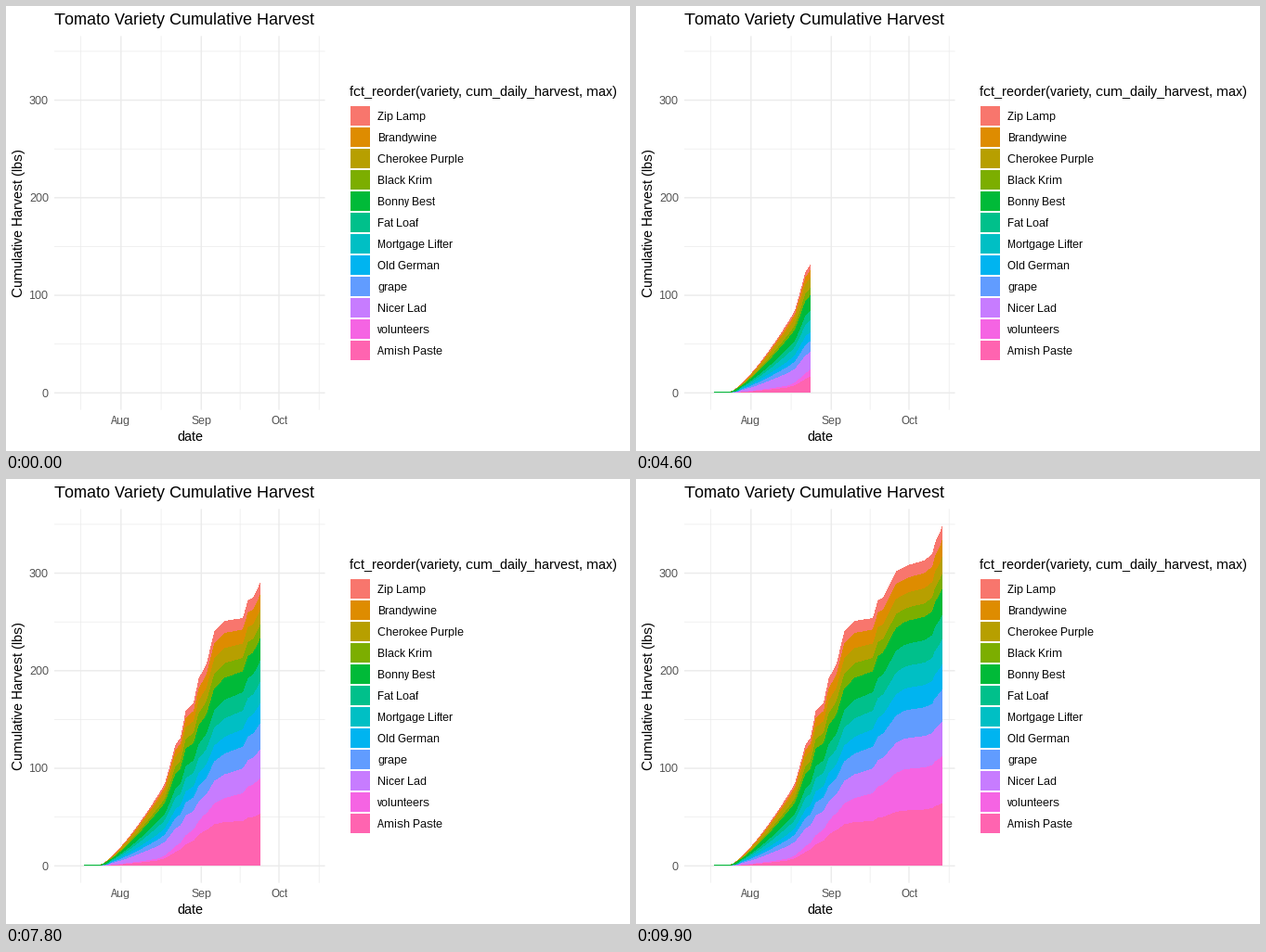
Write a matplotlib script that moves like this. It is 672 by 480 pixels and loops after 10 s.

```python
import matplotlib.pyplot as plt
import numpy as np
from matplotlib.animation import FuncAnimation
from matplotlib.patches import Polygon, Rectangle

plt.rcParams.update({
    "font.family": "Liberation Sans",
    "text.hinting": "default",
    "text.hinting_factor": 1,
})

W, H, DPI = 672, 480, 96
FRAMES, INTERVAL = 100, 100
LAST_DAY, FIRST_PICK = 95, 6.7          # days since 11 July
LEFT, RIGHT, TOP, BOTTOM = 52, 343.5, 32.4, 435.6
BASE = 417

# name, colour, relative yield in early, mid and late season
VARIETIES = [
    ("Zip Lamp", "#F8766D", 3, 11, 14),
    ("Brandywine", "#DE8C00", 4, 14, 17),
    ("Cherokee Purple", "#B79F00", 7, 14, 17),
    ("Black Krim", "#7CAE00", 4, 14, 15),
    ("Bonny Best", "#00BA38", 11, 20, 26),
    ("Fat Loaf", "#00C08B", 6, 16, 25),
    ("Mortgage Lifter", "#00BFC4", 8, 16, 25),
    ("Old German", "#00B4F0", 6, 14, 25),
    ("grape", "#619CFF", 7, 17, 32),
    ("Nicer Lad", "#C77CFF", 14, 20, 35),
    ("volunteers", "#F564E3", 2, 17, 47),
    ("Amish Paste", "#FF64B0", 6, 37, 63),
]
NAMES, COLORS, *YIELDS = zip(*VARIETIES)

# Bonny Best is picked alone at first, then all varieties ripen.
early, mid, late = np.array(YIELDS, float)
first = np.array([name == "Bonny Best" for name in NAMES], float)
SEASON = [13, 17, 35, 53, 80]
SHARES = np.array([w / w.sum() for w in (first, early, early, mid, late)])
STACKED = np.cumsum(SHARES[:, ::-1], axis=1)[:, ::-1]

# (day, total pounds): the big pickings and the pauses between them
PICKINGS = np.array([
    (38, 85), (40, 104), (42, 124), (44, 131.5), (46, 159), (49, 167),
    (51, 192), (54, 207), (57, 240), (61, 251), (68, 254), (70, 272),
    (72, 275), (77, 302), (82, 308.5), (88, 313), (91, 320), (92, 331),
    (95, 348),
])


def harvest(day):
    ramp = 1.3 + 1.2 * np.maximum(day - 13, 0) ** 1.316
    return np.where(day < 38, ramp, np.interp(day, *PICKINGS.T))


def px(day):
    return 65.25 + 265 / LAST_DAY * np.asarray(day)


def py(pounds):
    return 417.3 - 1.0525 * np.asarray(pounds)


fig = plt.figure(figsize=(W / DPI, H / DPI), dpi=DPI, facecolor="white")
ax = fig.add_axes([0, 0, 1, 1])
ax.set(xlim=(0, W), ylim=(H, 0))
ax.axis("off")


def label(x, y, text, size, color="black", **kw):
    ax.text(x, y, text, size=size, color=color, va="baseline", **kw)


def grid(xs, ys, width):
    style = dict(color="#EBEBEB", lw=width * 72 / DPI, zorder=1,
                 solid_capstyle="butt", snap=False)
    for x in xs:
        ax.plot([x, x], [TOP, BOTTOM], **style)
    for y in ys:
        ax.plot([LEFT, RIGHT], [y, y], **style)


MONTHS = {"Aug": 21, "Sep": 52, "Oct": 82}
POUNDS = [0, 100, 200, 300]
grid(px([5.5, 36.5, 67, 97.5]), py([50, 150, 250, 350]), 0.71)
grid(px(list(MONTHS.values())), py(POUNDS), 1.42)

label(52, 20, "Tomato Variety Cumulative Harvest", 13.2)
label(198, 469, "date", 11, ha="center")
label(18, 234, "Cumulative Harvest (lbs)", 11, ha="center", rotation=90,
      rotation_mode="anchor")
for name, day in MONTHS.items():
    label(px(day), 451, name, 8.8, "#4D4D4D", ha="center")
for value in POUNDS:
    label(46, py(value) + 4.4, str(value), 8.8, "#4D4D4D", ha="right")

label(370, 97, "fct_reorder(variety, cum_daily_harvest, max)", 11)
for i, (name, color) in enumerate(zip(NAMES, COLORS)):
    y = 108 + 23 * i
    ax.add_patch(Rectangle((371, y), 21, 21, fc=color, lw=0))
    label(400, y + 15, name, 8.8)

# Each layer reaches down to zero; lower ones cover the ones before.
layers = [
    ax.add_patch(Polygon(np.zeros((3, 2)), fc=color, lw=0, antialiased=False,
                         snap=False, zorder=3))
    for color in COLORS
]


def draw(frame):
    end = LAST_DAY * frame / (FRAMES - 1)
    shown = end >= FIRST_PICK
    end = max(end, 7)
    days = np.r_[FIRST_PICK, np.arange(7, end), end]
    # Half a pixel of shift, as hard-edged fills take every pixel they touch
    xs = np.minimum(px(days) + 0.5, np.round(px(end)))
    total = harvest(days)
    for layer, stack in zip(layers, STACKED.T):
        tops = py(total * np.interp(days, SEASON, stack)) + 0.5
        tops = np.minimum(tops, BASE)
        layer.set_visible(shown)
        layer.set_xy(np.column_stack([
            np.r_[xs, xs[-1], xs[0]], np.r_[tops, BASE, BASE]]))
    return layers


anim = FuncAnimation(fig, draw, frames=FRAMES, interval=INTERVAL,
                     repeat=True, repeat_delay=0)
plt.show()
```
